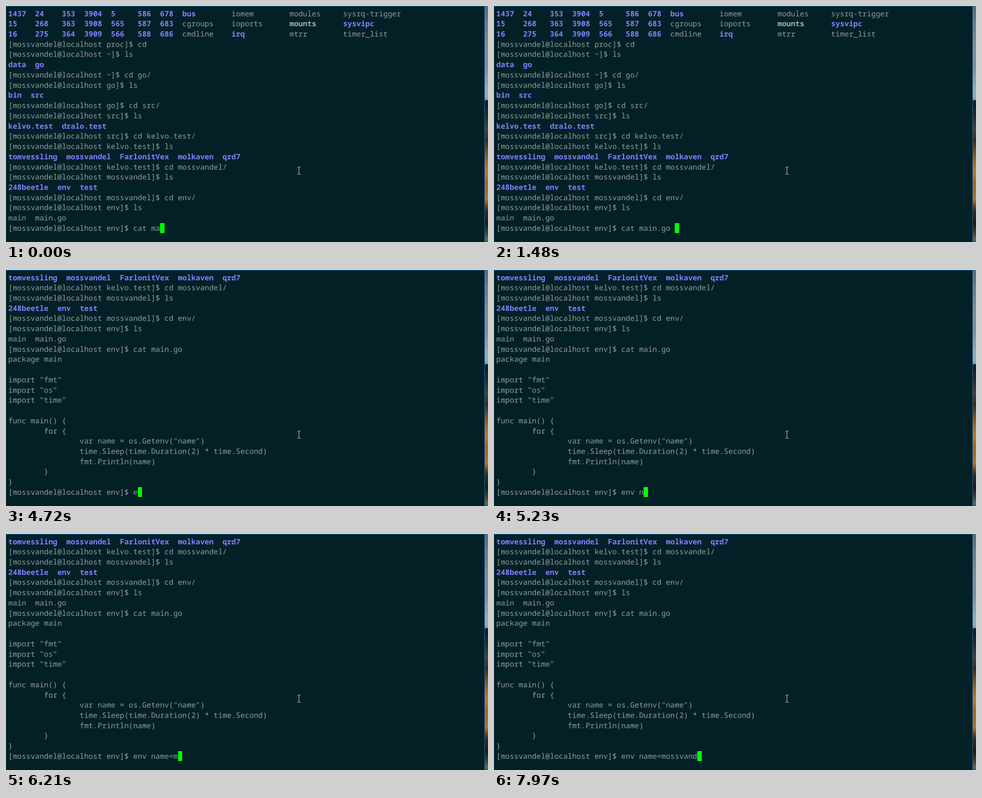
Recreate the animation shown at these times as an HTML page. Size 1067x525 px, loop 8000 ms.

```html
<!DOCTYPE html>
<html lang="en">
<head>
<meta charset="utf-8">
<title>Terminal</title>
<style>
  html, body { margin: 0; width: 100%; height: 100%; overflow: hidden; background: #032027; }
  #screen {
    position: absolute; left: 5px; top: 5.5px; margin: 0;
    font: 16.475px/22.74px "Noto Sans Mono", monospace;
    text-rendering: geometricPrecision; font-variant-ligatures: none;
    color: #929c9a;
  }
  b { color: #8080ff; }
  b.light { color: #a3b0ae; }
  b.dim { color: #5c7077; }
  .cursor { display: inline-block; width: 1ch; height: 22px; vertical-align: -5px; background: #00ff00; }
  #edge {
    position: absolute; left: 0; top: 0; width: 1060px; height: 525px; box-sizing: border-box;
    border: solid #0b6cb4; border-width: 1px 1px 0 0;
  }
  #photo {
    position: absolute; left: 1060px; top: 0; width: 7px; height: 525px;
    background: linear-gradient(#5b6b74 0, #747c7e 40px, #8b8b86 90px, #868d90 135px,
      #98a0a1 170px, #8db3c0 195px, #7fa5b4 208px, #17181a 211px, #292522 240px,
      #4c4033 275px, #3a2c20 300px, #8a5420 330px, #c07a28 365px, #a9651f 400px,
      #b8742a 430px, #3b2917 455px, #1d1a17 485px, #57431f 508px, #5c6a66 516px, #4a5a58 525px);
  }
  #pointer { position: absolute; left: 644px; top: 358px; }
</style>
</head>
<body>
<pre id="screen"></pre>
<div id="edge"></div>
<div id="photo"></div>
<svg id="pointer" width="9" height="17" fill="none" stroke="#e4e8e8">
  <path d="M1 .5H4M5 .5H8M4.5 1V16M1 16.5H4M5 16.5H8"/>
</svg>
<script>
const LOOP = 8000, ROWS = 22, RUN_AT = 1760;
const USER = "mossvandel", HOST = "kelvo.test";

const prompt = dir => `[${USER}@localhost ${dir}]$ `;
const dirs = (...names) => names.map(n => `<b>${n}</b>`).join("  ");

const history = [
  "<b>1437  24    353  3904  5     586  678  bus</b>        iomem        modules     sysrq-trigger",
  "<b>15    268   363  3908  565   587  683</b>  cgroups    ioports      <b class=light>mounts</b>      <b>sysvipc</b>",
  "<b>16    275   364  3909  566   588  686</b>  cmdline    <b>irq</b>          mtrr        timer_list",
  prompt("proc") + "cd",
  prompt("~") + "ls",
  dirs("data", "go"),
  prompt("~") + "cd go/",
  prompt("go") + "ls",
  dirs("bin", "src"),
  prompt("go") + "cd src/",
  prompt("src") + "ls",
  dirs(HOST, "dralo.test"),
  prompt("src") + `cd ${HOST}/`,
  prompt(HOST) + "ls",
  dirs("tomvessling", USER, "FarlonitVex", "molkaven", "qrd7"),
  prompt(HOST) + `cd ${USER}/`,
  prompt(USER) + "ls",
  dirs("248beetle", "env", "test"),
  prompt(USER) + "cd env/",
  prompt("env") + "ls",
  "<b class=dim>main</b>  main.go"
];

const program = `package main

import "fmt"
import "os"
import "time"

func main() {
        for {
                var name = os.Getenv("name")
                time.Sleep(time.Duration(2) * time.Second)
                fmt.Println(name)
        }
}`.split("\n");

// Each key: [time, number of characters typed by then]
const first = {
  text: "cat main.go ",
  keys: [[0, 6], [150, 7], [520, 8], [1230, 9], [1480, 12]]
};
const second = {
  text: `env name=${USER}`,
  keys: [[4720, 1], [4840, 2], [4990, 3], [5110, 4], [5230, 5], [5380, 6], [5500, 8],
    [5930, 9], [6210, 10], [6330, 11], [6580, 13], [6860, 14], [7570, 15], [7820, 16], [7970, 17]]
};

function typed({ text, keys }, t) {
  const key = keys.filter(([time]) => time <= t).pop();
  return text.slice(0, key ? key[1] : 0);
}

const screen = document.getElementById("screen");
let shown = "";

function render(t) {
  const ran = t >= RUN_AT;
  const output = ran ? [prompt("env") + first.text, ...program] : [];
  const input = prompt("env") + typed(ran ? second : first, t) + '<span class="cursor"></span>';
  const html = [...history, ...output, input].slice(-ROWS).join("\n");
  if (html !== shown) screen.innerHTML = shown = html;
}

const start = performance.now();
function tick() {
  render((performance.now() - start) % LOOP);
  requestAnimationFrame(tick);
}
tick();
</script>
</body>
</html>
```
